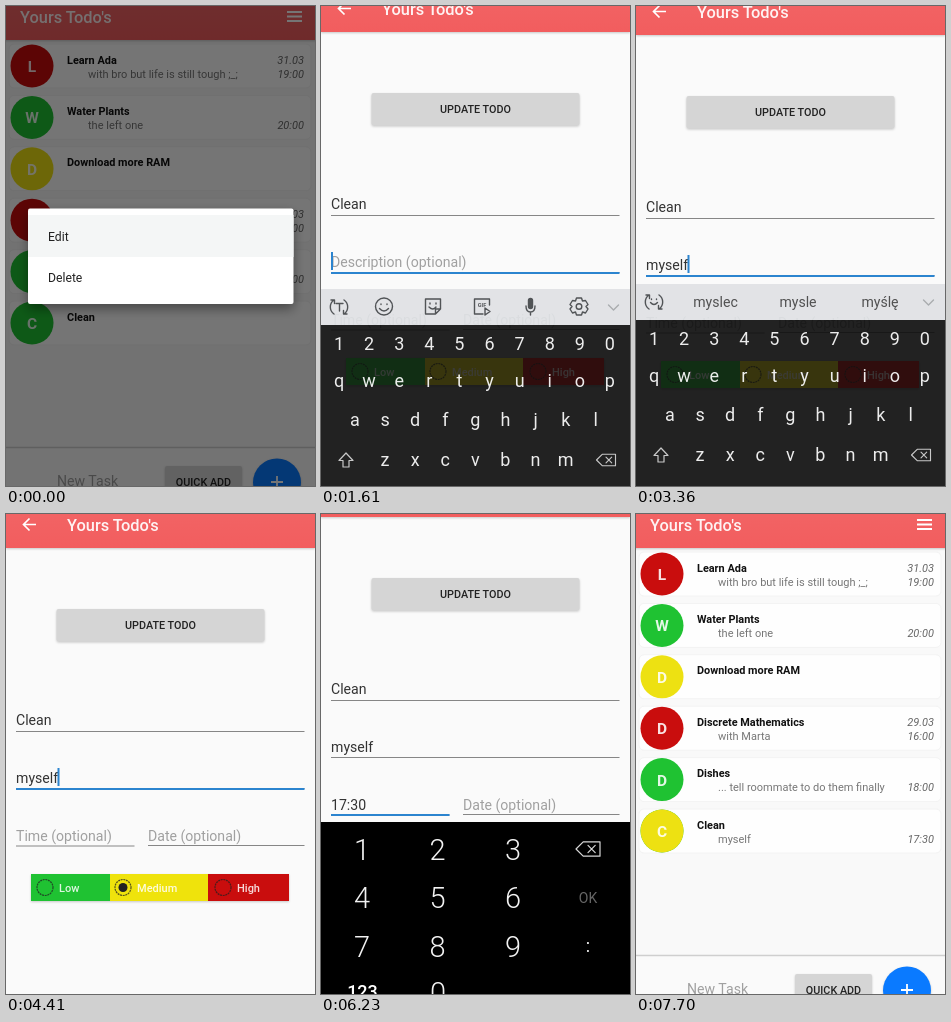
Recreate the animation shown at these times as an HTML page. Size 309 by 480 pixels, loop 8000 ms.

```html
<!DOCTYPE html>
<html lang="en">
<head>
<meta charset="utf-8">
<title>Todo list</title>
<style>
html, body { margin: 0; width: 100%; height: 100%; overflow: hidden; background: #fafafa; }
svg { display: block; width: 100vw; height: 100vh; font-family: Roboto, "Noto Sans", sans-serif; }
.title { font-size: 16.4px; font-weight: 500; fill: #fff; fill-opacity: .92; }
.name { font-size: 10.9px; font-weight: 700; fill: #111; }
.note { font-size: 11px; fill: #777; }
.when { font-size: 11px; font-style: italic; fill: #666; text-anchor: end; }
.badge { font-size: 15.5px; font-weight: 700; fill: #fff; fill-opacity: .88; text-anchor: middle; }
.caps { font-size: 10.8px; font-weight: 500; fill: #222; text-anchor: middle; }
.input { font-size: 14.1px; fill: #333; }
.hint { font-size: 14.1px; fill: #a0a0a0; }
.menu { font-size: 12.2px; fill: #222; }
.radio { font-size: 11px; font-weight: 500; fill: #fff; fill-opacity: .85; }
.ring { fill: none; stroke: #222; stroke-opacity: .75; stroke-width: 1.2; stroke-dasharray: 2 .7; }
.line { stroke: #868686; }
.focus { stroke: #2b84cf; stroke-width: 2; }
.key { font-size: 18px; fill: #fff; text-anchor: middle; }
.word { font-size: 14.1px; fill: #444; text-anchor: middle; }
.digit { font-size: 29px; font-weight: 300; fill: #f2f2f2; text-anchor: middle; }
.icon { fill: none; stroke: #44474a; stroke-width: 1.4; stroke-linecap: round; stroke-linejoin: round; }
.light { stroke: #d8d8d8; stroke-width: 1.2; }
.raised { filter: drop-shadow(0 1px 1px rgba(0,0,0,.2)); }
</style>
</head>
<body>
<svg viewBox="0 0 309 480" preserveAspectRatio="none">
  <defs>
    <linearGradient id="red" x2="0" y2="1">
      <stop offset="0" stop-color="#f26566"/><stop offset="1" stop-color="#f25d5e"/>
    </linearGradient>
    <path id="erase" d="M-10 0L-4-6H10V6H-4ZM0-3L6 3M6-3L0 3"/>
    <path id="turn" d="M-5 7A8.5 8.5 0 0 1-5-7M-8-7H-4.500V-3.500M5-7A8.500 8.500 0 0 1 5 7M8 7H4.500V3.500"/>
  </defs>
  <rect width="309" height="480" fill="#f9f9f9"/>

  <g class="listX">
    <rect x="-30" width="370" height="480" fill="#f9f9f9"/>
    <g id="rows"></g>
    <g class="header">
      <rect x="-30" y="-10" width="370" height="44" fill="url(#red)" class="raised"/>
      <text class="title" x="14" y="17">Yours Todo's</text>
      <path d="M281 6H296M281 10.500H296M281 15H296" stroke="#fff" stroke-width="1.800"/>
    </g>
    <g class="barY">
      <rect x="-30" y="441" width="370" height="72" fill="#fafafa"/>
      <path d="M-30 441.500H340" stroke="#cfcfcf" stroke-width="1.500"/>
      <text class="hint" x="51" y="480">New Task</text>
      <rect class="raised" x="159" y="460" width="77" height="33" rx="2" fill="#d5d5d5"/>
      <text class="caps" x="197.500" y="479.500">QUICK ADD</text>
      <circle class="raised" cx="271" cy="476.500" r="24" fill="#0a7aff"/>
      <path d="M265 476H277M271 470V482" stroke="#fff" stroke-width="1.800"/>
    </g>
  </g>
  <rect class="shade" width="309" height="480"/>

  <g class="dialog">
    <rect width="309" height="480" fill-opacity=".54"/>
    <rect x="22" y="202.500" width="265.500" height="95.500" rx="2" fill="#fff" style="filter:drop-shadow(0 5px 6px rgba(0,0,0,.4))"/>
    <rect x="22" y="209" width="265.500" height="42" fill="#f4f6f6"/>
    <text class="menu" x="42" y="234.500">Edit</text>
    <text class="menu" x="42" y="275.500">Delete</text>
  </g>

  <g class="formX">
    <rect width="309" height="480" fill="#fafafa" style="filter:drop-shadow(-1px 0 2px rgba(0,0,0,.2))"/>
    <g class="pan">
      <rect y="-10" width="309" height="44" fill="url(#red)" class="raised"/>
      <path d="M30 10.500H18M23.500 4.500L17.500 10.500L23.500 16.500" fill="none" stroke="#fff" stroke-width="1.700"/>
      <text class="title" x="61" y="17">Yours Todo's</text>
      <g class="raised">
        <rect x="50.500" y="95" width="208" height="32.500" rx="2" fill="#d5d5d5"/>
        <rect class="press" x="50.500" y="95" width="208" height="32.500" rx="2" fill="#cbcbcb"/>
      </g>
      <text class="caps" x="154.500" y="115">UPDATE TODO</text>

      <text class="input" x="10" y="211">Clean</text>
      <path class="line" d="M10 217.500H298.500"/>
      <path class="focus nameOn" d="M10 217H298.500"/>
      <path class="focus nameCaret" d="M46.500 197V214" stroke-width="1.500"/>

      <text class="hint noteHint" x="10" y="269">Description (optional)</text>
      <text class="input" x="10" y="269" id="noteText"></text>
      <path class="line" d="M10 274.500H298.500"/>
      <path class="focus noteOn" d="M10 275H298.500"/>
      <g class="noteOn"><path class="focus caretX" d="M11 254V272"/></g>

      <text class="hint timeHint" x="10" y="326.500">Time (optional)</text>
      <text class="input" x="10" y="326.500" id="timeText"></text>
      <path class="line" d="M10 332H128.500"/>
      <path class="focus timeOn" d="M10 332H128.500"/>
      <text class="hint" x="142" y="326.500">Date (optional)</text>
      <path class="line" d="M142 331.500H298.500"/>
      <g id="radios" class="raised"></g>
    </g>
  </g>

  <g class="kbFade"><g class="kbY">
    <rect width="309" height="37" fill="#e0e2e5"/>
    <rect y="36" width="309" height="250" fill="#0f0f0f"/>
  </g></g>
  <g class="ghost"><g class="pan"><use href="#radios"/></g></g>
  <g class="kbFade"><g class="kbY">
    <g id="keys"></g>
    <path class="icon light" d="M25 164L18 171.500H22V178H28V171.500H32Z"/>
    <use href="#erase" class="icon light" transform="translate(285 171) scale(.95)"/>
    <use href="#turn" class="icon" transform="translate(18 18)"/>
    <path class="icon" d="M287.500 16L292.500 21L297.500 16" style="stroke:#a4a7aa"/>
    <g class="tools">
      <path class="icon" d="M15 14.500H22M18.500 14.500V22"/>
      <g class="icon">
        <circle cx="63" cy="17.500" r="8.500"/><path d="M60 15V15.500M66 15V15.500M58.500 19.500Q63 24.500 67.500 19.500"/>
        <path d="M104.500 10H119.500V20L114.500 25H104.500ZM119.500 20H114.500V25M109 14V15M115 14V15M108 18Q112 22 115 18"/>
        <path d="M168.500 16V10H153.500V25H162M164 19L169 22.500L164 26Z"/>
        <path d="M205 17Q205 23 209.500 23T214 17M209.500 23V26"/>
        <rect x="207.500" y="9.500" width="4" height="10" rx="2" fill="#44474a"/>
        <circle cx="258" cy="17.500" r="2.800"/>
        <path d="M255.500 9H260.500L261.500 12L264.500 11.500L267 15.500L265 17.500L267 20L264.500 24L261.500 23L260.500 26H255.500L254.500 23L251.500 24L249 20L251 17.500L249 15.500L251.500 11.500L254.500 12Z"/>
      </g>
      <text x="161" y="18" font-size="5.500" font-weight="700" fill="#44474a" text-anchor="middle">GIF</text>
    </g>
    <g class="words">
      <path class="icon" d="M15.500 15V15.500M20.500 15V15.500M14.500 18.500Q18 22.500 21.500 18.500"/>
      <text class="word" x="79.500" y="23">myslec</text>
      <text class="word" x="162" y="23">mysle</text>
      <text class="word" x="244" y="23">myślę</text>
    </g>
  </g></g>

  <g class="padFade"><g class="padY">
    <rect width="309" height="240"/>
    <g id="digits"></g>
    <use href="#erase" class="icon light" transform="translate(267 27) scale(1.200)" style="stroke-width:1"/>
    <text x="267" y="80.500" font-size="14" fill="#666" text-anchor="middle">OK</text>
    <text class="key" x="267" y="130">:</text>
    <text class="key" x="41.500" y="176" font-weight="500">123</text>
  </g></g>
</svg>

<script>
const LOOP = 8000;
const RED = '#c90d0d', GREEN = '#1fc232', YELLOW = '#ede112';
const $ = id => document.getElementById(id);
const text = (cls, x, y, s) => `<text class="${cls}" x="${x}" y="${y}">${s}</text>`;

// List rows
const todos = [
  ['Learn Ada', RED, 'with bro but life is still tough ;_;', '31.03', '19:00'],
  ['Water Plants', GREEN, 'the left one', '', '20:00'],
  ['Download more RAM', YELLOW, '', '', ''],
  ['Discrete Mathematics', RED, 'with Marta', '29.03', '16:00'],
  ['Dishes', GREEN, '... tell roommate to do them finally', '', '18:00'],
  ['Clean', GREEN, '', '', '']
];
const disc = (color, cls = '') => `<circle class="${cls}" cx="26" cy="60" r="21.5" fill="${color}"/>`;
$('rows').innerHTML = todos.map(([name, color, note, date, time], i) => {
  const last = i === todos.length - 1;
  return `<g transform="translate(0 ${i * 51.4})">
    <rect x="3" y="38" width="302" height="44" rx="5" fill="#fefefe" stroke="#f3f3f3"/>
    ${disc(color)}${last ? disc(YELLOW, 'saved') : ''}
    ${text('badge', 26, 66, name[0])}${text('name', 61, 57.5, name)}
    ${text('note', 82, 71.5, note)}${text('when', 298, 57.5, date)}${text('when', 298, 71.5, time)}
    ${last ? `<g class="saved">${text('note', 82, 71.5, 'myself')}${text('when', 298, 71.5, '17:30')}</g>` : ''}
  </g>`;
}).join('');

// Priority radios
$('radios').innerHTML = [['Low', 25, 79, 39, GREEN], ['Medium', 104, 98, 117, '#efe30c'], ['High', 202, 81, 217, RED]]
  .map(([label, x, w, cx, color]) => `<rect x="${x}" y="360" width="${w}" height="27" fill="${color}"/>
    <circle class="ring" cx="${cx}" cy="373.5" r="8"/>${text('radio', cx + 14, 377.5, label)}`).join('') +
  '<circle class="picked" cx="117" cy="373.5" r="4.500" fill="#222"/>';

// Keyboards
$('keys').innerHTML = [['1234567890', 18, 61], ['qwertyuiop', 18, 98], ['asdfghjkl', 34, 137], ['zxcvbnm', 64, 177]]
  .map(([row, x, y]) => [...row].map((c, i) => text('key', x + i * 30.1, y, c)).join('')).join('');
$('digits').innerHTML = [...'123456789'].map((c, i) =>
  text('digit', 41 + i % 3 * 75.5, 37.5 + Math.floor(i / 3) * 48.5, c)).join('') + text('digit', 117, 181, 0);

// Animation tracks: pairs of [time in ms, value], held until the next pair
let css = '';
function track(name, style, pairs) {
  const stops = [...pairs, [LOOP, pairs[pairs.length - 1][1]]];
  css += `@keyframes ${name}{${stops.map(([t, v]) => `${t / LOOP * 100}%{${style(v)}}`).join('')}}
    .${name}{animation:${name} ${LOOP}ms step-end infinite}`;
}
const moveX = v => `transform:translateX(${v}px)`;
const moveY = v => `transform:translateY(${v}px)`;
const fade = v => `opacity:${v}`;
const ink = v => `fill-opacity:${v}`;
// Values placed one tick (70 ms) apart
const ticks = (start, ...values) => values.map((v, i) => [start + i * 70, v]);
const shown = (from, to) => [[0, from ? 0 : 1], ...(from ? [[from, 1]] : []), ...(to ? [[to, 0]] : [])];

track('dialog', fade, ticks(0, 1, 1, .5, 0));
track('formX', moveX, [[0, 320], ...ticks(210, 240, 150, 81.5, 38, 16, 5, 0),
  ...ticks(7280, 8, 40, 105, 180, 245, 290, 320)]);
track('listX', moveX, [[0, 0], ...ticks(210, -1, -3, -6, -12, -16, -20, -22),
  ...ticks(7280, -21, -16, -8, -3, -1, 0)]);
track('shade', fade, [[0, 0], ...ticks(210, .02, .04, .06, .08, .1),
  ...ticks(7280, .1, .09, .07, .04, .02, .01, 0)]);
track('barY', moveY, [[0, 0], [4830, -203], [7420, 0]]);
track('pan', moveY, [[0, 0], ...ticks(1470, -2, -5, -8, -10, -12),
  ...ticks(3220, -10, -7.5, -5, -2, 0), ...ticks(4830, -5, -12, -18, -24, -28, -31),
  ...ticks(7350, -20, -8, 0)]);
track('kbY', moveY, [[0, 480], ...ticks(1470, 313, 298, 283, 274, 268),
  ...ticks(3220, 271, 274, 278, 283, 480)]);
track('kbFade', fade, [[0, 0], ...ticks(1470, .35, .7, .92, 1), ...ticks(3220, .98, .95, .92, .5, 0)]);
track('ghost', fade, [[0, 0], ...ticks(1470, .4, .25, .11, 0), ...ticks(3220, .03, .07, .11, .3, 0)]);
track('padY', moveY, [[0, 480], ...ticks(4830, 350, 330, 318, 312, 308), ...ticks(7350, 320, 340, 480)]);
track('padFade', fade, [[0, 0], ...ticks(4830, .3, .6, .85, 1), ...ticks(7350, .8, .4, 0)]);

track('nameOn', fade, shown(0, 1470));
track('nameCaret', fade, shown(0, 1120));
track('noteOn', fade, shown(1470, 4830));
track('noteHint', fade, shown(0, 2030));
track('timeOn', fade, shown(4830));
track('timeHint', fade, shown(0, 5390));
track('tools', fade, shown(0, 2030));
track('words', fade, shown(2030));
track('picked', fade, shown(3990));
track('press', fade, shown(6930));
track('saved', fade, shown(7350));

// Typed text, one character at a time
function type(id, word, times) {
  $(id).innerHTML = [...word].map((c, i) => `<tspan class="${id}${i}">${c}</tspan>`).join('');
  times.forEach((t, i) => track(id + i, ink, shown(t)));
}
const noteTimes = [2030, 2170, 2380, 2590, 2730, 2870];
const caretStops = [11.5, 18.5, 26, 33.5, 37, 41.5];
type('noteText', 'myself', noteTimes);
type('timeText', '17:30', [5390, 5460, 5670, 5950, 6230]);
track('caretX', moveX, [[0, 0], ...noteTimes.map((t, i) => [t, caretStops[i]])]);

const sheet = document.createElement('style');
sheet.textContent = css;
document.head.append(sheet);
</script>
</body>
</html>
```
